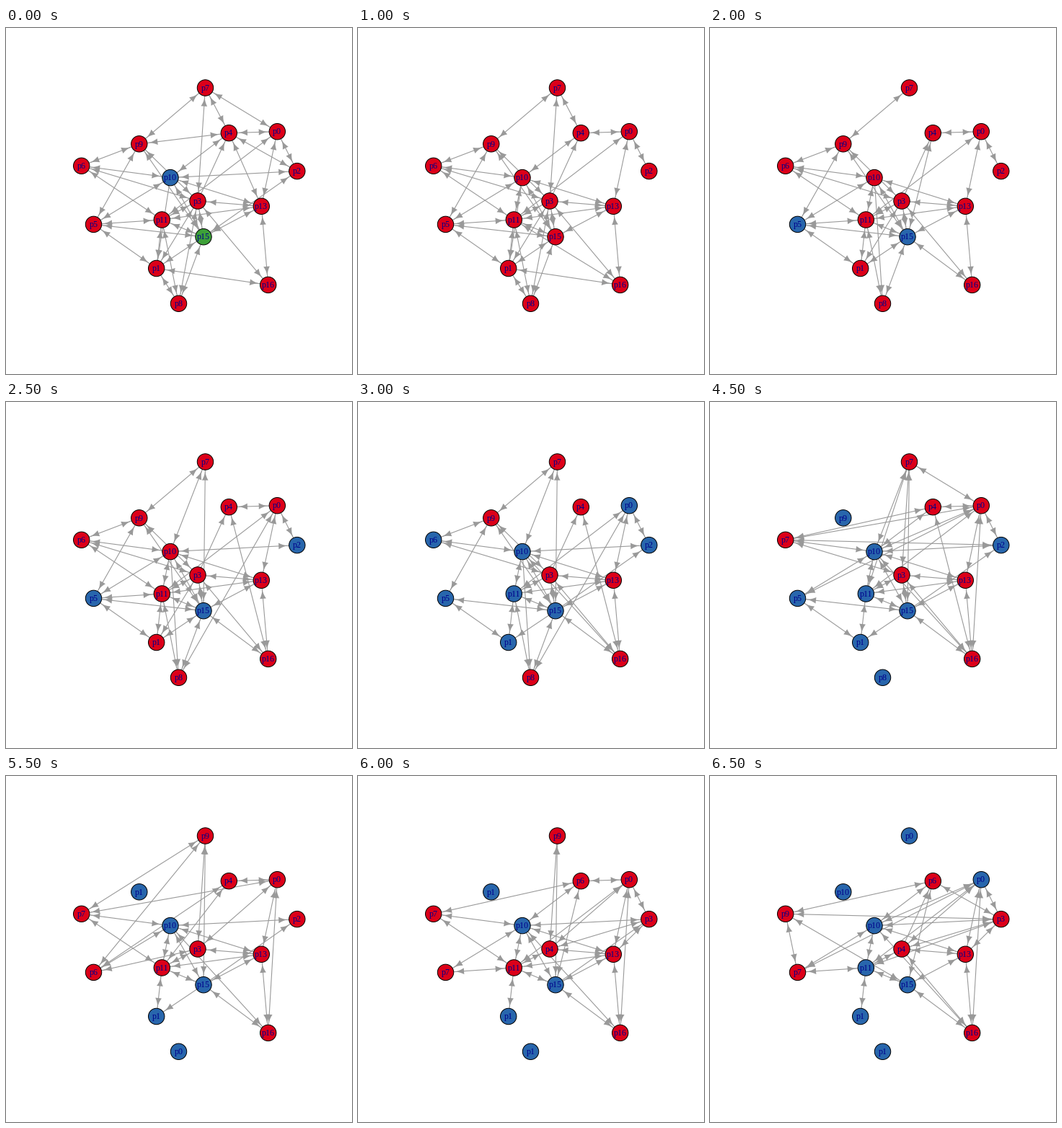
Write a matplotlib script that moves like this. It is 480x480 px and loops after 7000 ms.

```python
import numpy as np
import matplotlib.pyplot as plt
from matplotlib.animation import FuncAnimation
from matplotlib.collections import LineCollection, PolyCollection

SIZE, DPI = 480, 80
PX = 72 / DPI                      # points per pixel
RADIUS, HEAD = 11.2, 14.4
RED, BLUE, GREEN, GREY = "#dc0019", "#2866ac", "#3da038", "#999999"

NODES = "ABCDEFGHIJKLMNO"
POS = dict(zip(NODES, np.array([
    (276.5, 83), (309.3, 145.7), (376.3, 143.7), (184.8, 160.8), (104.7, 191.3),
    (403.8, 198.6), (228, 207.6), (266, 240), (354.3, 247.3), (216.3, 266),
    (121.5, 272.4), (274, 289.7), (208.7, 333.5), (363.7, 356.4), (239.5, 382.3)])))
LABELS = "p7 p4 p0 p9 p6 p2 p10 p3 p13 p11 p5 p15 p1 p16 p8"

# A lower-case letter marks an end without an arrowhead.
LINKS = ("AD AB AC AH BD BC BG BI BF hB CF CI CJ FG FL DE DK DH DL EG EH EJ GI GK "
         "gM GL HI HN HJ HL HM HO IJ IL IN JK JL JM JO KL KM LM LO MO MN")

# One entry per step: links added, links dropped, recoloured nodes, new labels
STEPS = [
    ("", "", "", ""),
    ("", "AC BI BF FG BD", "G-r L-r E-b A-b", ""),
    ("JN GJ", "FL", "E-r A-r", ""),
    ("BL gO", "AB AH HO BG", "A-b", ""),
    ("LN", "MO MN JN gM", "A-r K-b L-b", ""),
    ("AG AL BN FG CO", "BL", "F-b", ""),
    ("GN lF lM", "EJ GK JK HM BC LM", "C-b E-b G-b J-b M-b", ""),
    ("EF HO", "DL", "E-r", ""),
    ("AC AJ BE BG BC CE CG CK IO NO GK", "LO hB", "C-r K-b D-b", ""),
    ("AH CN", "JO gO HO CO IO NO DE DK DH AD", "O-b", "E-p7"),
    ("BJ EJ CH", "BE BN CG CJ EF KL KM", "O-r J-r", "K-p6 D-p1"),
    ("AE AK BK HK", "AC AG AJ BG CK CF EH HN HL", "O-b F-r K-r", "A-p9 O-p0"),
    ("BE BG BL FH FI CF CJ JK", "AE AK BK BJ CE HK lM", "", "F-p3 O-p1 B-p6 H-p4 K-p7"),
    ("hB BF CG EF EK EL FJ CK HN", "AH AL BC lF EG EJ GL IJ",
     "A-b C-b J-b", "A-p0 D-p10 E-p9"),
]


def pairs(text):
    return [item.split("-") for item in text.split()]


def build_states():
    links = LINKS.split()
    labels = dict(zip(NODES, LABELS.split()))
    colours = dict.fromkeys(NODES, RED)
    colours.update(G=BLUE, L=GREEN)
    states = []
    for add, drop, paint, rename in STEPS:
        gone = drop.split()
        links = [link for link in links if link not in gone] + add.split()
        for node, key in pairs(paint):
            colours[node] = {"r": RED, "b": BLUE}[key]
        labels.update(pairs(rename))
        states.append((links, dict(colours), dict(labels)))
    return states


def arrowhead(tip, way):
    """Head with sides that widen with the square of the distance."""
    along = np.sqrt(np.linspace(0, 1, 12)) * HEAD
    half = 0.3 * along ** 2 / HEAD + 0.08
    side = np.array([-way[1], way[0]])
    back = tip - np.outer(along, way)
    wide = np.outer(half, side)
    return np.vstack([back + wide, (back - wide)[::-1]])


states = build_states()
fig = plt.figure(figsize=(SIZE / DPI, SIZE / DPI), dpi=DPI, facecolor="white")
ax = fig.add_axes([0, 0, 1, 1])


def draw(step):
    links, colours, labels = states[step]
    ax.clear()
    ax.set(xlim=(0, SIZE), ylim=(SIZE, 0))
    ax.axis("off")
    lines, heads = [], []
    for a, b in links:
        start, end = POS[a.upper()], POS[b.upper()]
        way = (end - start) / np.hypot(*(end - start))
        tail, tip = start + way * RADIUS, end - way * RADIUS
        lines.append((tail, tip))
        if a.isupper():
            heads.append(arrowhead(tail, -way))
        if b.isupper():
            heads.append(arrowhead(tip, way))
    ax.add_collection(LineCollection(lines, colors=GREY, linewidths=1.1 * PX, zorder=1))
    ax.add_collection(PolyCollection(heads, facecolors=GREY, edgecolors="none", zorder=2))
    for node, (x, y) in POS.items():
        ax.add_patch(plt.Circle((x, y), RADIUS, fc=colours[node], ec="black",
                                lw=PX, zorder=3))
        ax.text(x, y + 3.7, labels[node], color="#00008b", ha="center", va="baseline",
                family="Liberation Serif", size=12 * PX, zorder=4)
    return []


anim = FuncAnimation(fig, draw, frames=len(STEPS), interval=500,
                     repeat=True, repeat_delay=0, blit=False)
plt.show()
```
